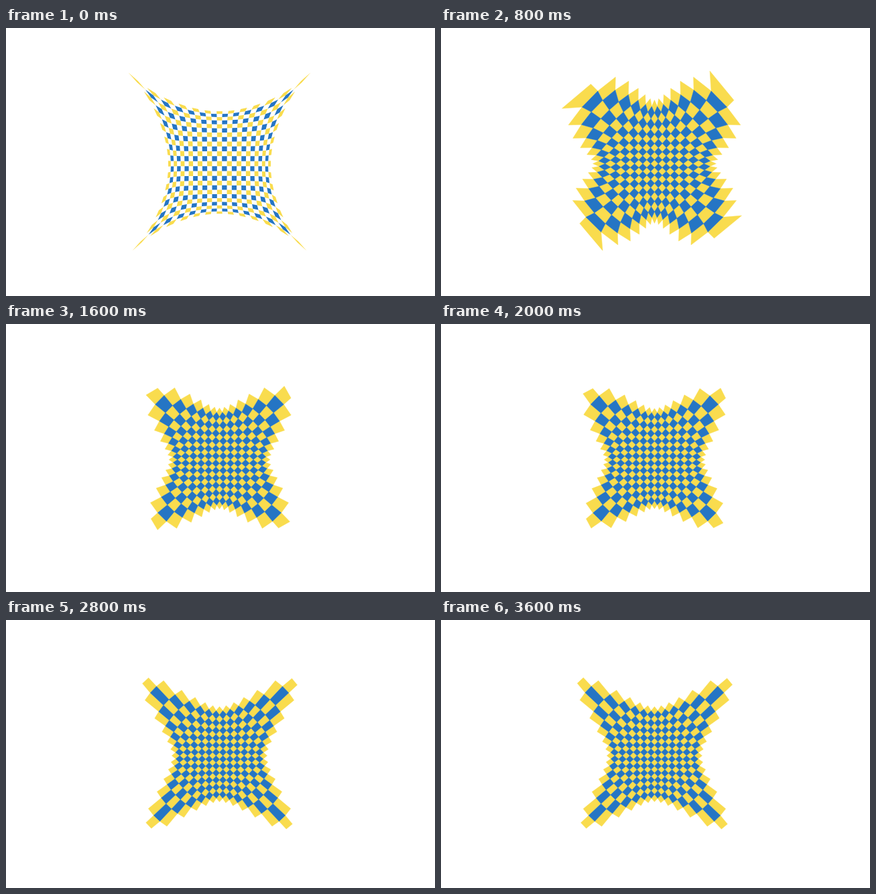
These frames come from a looping animation (640 px wide and 400 px high, 4000 ms). An HTML page with a canvas:

```html
<!DOCTYPE html>
<html lang="en">
<head>
<meta charset="utf-8">
<title>Checkerboard relaxation</title>
<style>
  html, body { margin: 0; width: 100%; height: 100%; overflow: hidden; background: #fff; }
  canvas { display: block; width: 640px; height: 400px; }
</style>
</head>
<body>
<canvas id="stage" width="640" height="400"></canvas>
<script>
const ctx = document.getElementById('stage').getContext('2d');
const YELLOW = '#f9dc4e', BLUE = '#2575c4';
const N = 12, STEP = 400, CX = 318.5, CY = 202.5;

// size: scale at the centre; grow: stretch along an axis; flare: pull to the corners;
// pinch, cornerPinch: squeeze near the rim; tilt: larger top than bottom;
// long, short: the two outer corner points, as [outward, sideways]
const open = { size: 89, grow: -14.4, flare: 33, pinch: -12, cornerPinch: 0, tilt: 0.022 };
const wide = {
  size: 94, grow: 28, flare: 85, pinch: 43, cornerPinch: 44, tilt: 0.04,
  long: [195, 78], short: [154, 112]
};
const middle = {
  size: 69, grow: 13.5, flare: 56, pinch: 21, cornerPinch: 20, tilt: 0.03,
  long: [134, 80], short: [115, 92]
};
const small = {
  size: 66, grow: 4, flare: 43, pinch: 16, cornerPinch: 2, tilt: 0.025,
  long: [115.5, 88.5], short: [105.5, 90.5]
};
const square = {
  size: 65, grow: 3.6, flare: 36, pinch: 15, cornerPinch: -6, tilt: 0.02,
  long: [104.5, 96.5], short: [104, 90]
};
const star = {
  size: 62, grow: 3, flare: 42, pinch: 4, cornerPinch: -5, tilt: 0.028,
  long: [112, 105], short: [113, 103]
};

// each step blends two poses
const steps = [
  [open, open, 0], [wide, wide, 0], [middle, middle, 0], [small, small, 0],
  [small, square, 0.75], [square, square, 0], [square, star, 0.75],
  [square, star, 0.98], [star, star, 0], [star, star, 0]
];

function stretch(pose, u, v) {
  const U = u * u, V = v * v;
  const rim = (pose.pinch + pose.cornerPinch * U) * V ** 3;
  return u * (pose.size + pose.grow * U + pose.flare * U * V - rim);
}

// the outer corner points form a pinwheel
function cornerTip(pose, i, j) {
  const flat = Math.abs(i) > Math.abs(j);
  const [out, side] = flat === (i * j > 0) ? pose.long : pose.short;
  return [Math.sign(i) * (flat ? out : side), Math.sign(j) * (flat ? side : out)];
}

function point(pose, i, j) {
  const u = i / N, v = j / N;
  const isTip = pose.long && Math.abs(i) + Math.abs(j) > 2 * N;
  const [x, y] = isTip ? cornerTip(pose, i, j) : [stretch(pose, u, v), stretch(pose, v, u)];
  const scale = 1 - pose.tilt * v;
  return [CX + x * scale, CY + y * scale];
}

function blend([from, to, k], i, j) {
  const p = point(from, i, j), q = point(to, i, j);
  return [p[0] + (q[0] - p[0]) * k, p[1] + (q[1] - p[1]) * k];
}

function tiles(step, start, color) {
  const spread = step[0] === open;
  const shape = spread
    ? [[-0.5, -0.5], [0.5, -0.5], [0.5, 0.5], [-0.5, 0.5]]
    : [[-1, 0], [0, -1], [1, 0], [0, 1]];
  ctx.beginPath();
  for (let i = start; i <= -start; i += 2) {
    for (let j = start; j <= -start; j += 2) {
      shape.forEach(([di, dj], k) => {
        const p = blend(step, i + di, j + dj);
        k ? ctx.lineTo(...p) : ctx.moveTo(...p);
      });
      ctx.closePath();
    }
  }
  ctx.fillStyle = ctx.strokeStyle = color;
  ctx.lineWidth = 0.5;
  ctx.lineJoin = 'bevel';
  ctx.fill();
  // hide hairline seams between touching tiles
  if (!spread) ctx.stroke();
}

let shown = -1;
function frame() {
  const index = Math.floor(performance.now() / STEP) % steps.length;
  if (index !== shown) {
    shown = index;
    ctx.fillStyle = '#fff';
    ctx.fillRect(0, 0, 640, 400);
    tiles(steps[index], -N, YELLOW);
    tiles(steps[index], 1 - N, BLUE);
  }
  requestAnimationFrame(frame);
}
frame();
</script>
</body>
</html>
```
